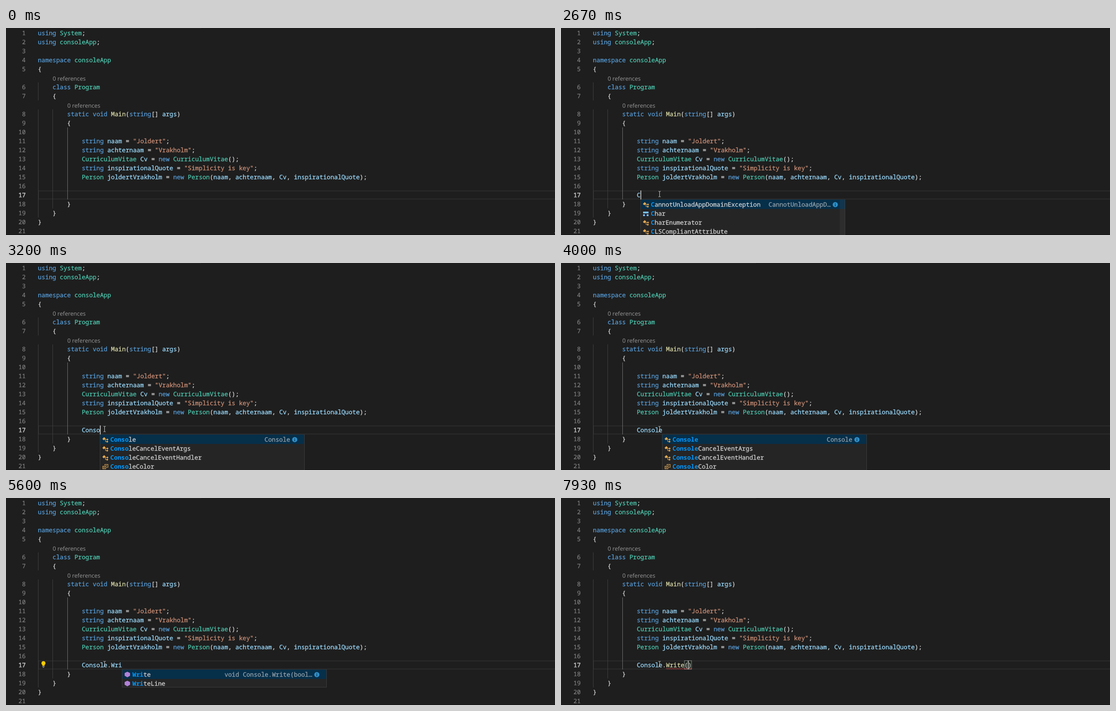
An HTML page that plays this animation: 1217x460 px, repeating every 8000 ms.

```html
<!DOCTYPE html>
<html lang="en">
<head>
<meta charset="utf-8">
<title>Editor</title>
<style>
  html, body { margin: 0; width: 100%; height: 100%; overflow: hidden; background: #1e1e1e; }
  svg { display: block; width: 1217px; height: 460px; }
  text {
    font: 13.51px "Noto Sans Mono", "DejaVu Sans Mono", monospace;
    font-variant-ligatures: none;
    text-rendering: geometricPrecision;
    white-space: pre;
    fill: currentColor;
    stroke: currentColor;
    stroke-width: .3px;
  }
  .lens { font: 12.7px "Open Sans", "Noto Sans", sans-serif; color: #999; stroke: none; }
  .num { color: #858585; text-anchor: end; stroke-width: .15px; }
  .now { color: #c6c6c6; stroke-width: .6px; }
  .key { color: #569cd6; }
  .type { color: #4ec9b0; }
  .str { color: #ce9178; }
  .fn { color: #dcdcaa; }
  .var { color: #9cdcfe; }
  .sym, .item { color: #d4d4d4; }
  .hit { color: #0097fb; font-weight: bold; stroke: none; }
  .detail { color: #d4d4d4; opacity: .7; text-anchor: end; }
</style>
</head>
<body>
<svg viewBox="0 0 1217 460">
  <defs>
    <g id="class" fill="#e8ab53">
      <path d="M.5 5 4.500 1 8 4 4 8Z M9.500 6.200 12 4l2 2.200-2.300 2.200Z M9 11l2.500-2.300L13.800 11l-2.300 2.300Z"/>
      <path d="M6 6h4M7.500 6v5h2" fill="none" stroke="#e8ab53"/>
    </g>
    <path id="struct" fill="#75beff" d="M1 2h12v4H1Z M1 8h4v4H1Z M9 8h4v4H9Z"/>
    <path id="enum" fill="none" stroke="#e8ab53" stroke-width="1.1"
      d="M6 4V1.500h7V8H9M8 4h3M1.500 5.500h6.500v6H1.500ZM3 7.500h3M3 9.500h3"/>
    <g id="prop">
      <path d="M2 11 8 5" stroke="#c5c5c5" stroke-width="3" stroke-linecap="round"/>
      <path d="M13.400 3 11 5.200 8.800 3.200 11 .6A4 4 0 1 0 13.400 3Z" fill="#c5c5c5"/>
    </g>
    <path id="method" fill="#b180d7" d="M7 0 13 3v6l-6 3.500L1 9V3Z"/>
  </defs>
  <g id="page"></g>
  <g id="live"></g>
  <path id="mouse" d="M-2.500-6H-.5L0-5.500.500-6H2.500M0-5.500V5.500M-2.500 6H-.5L0 5.500.500 6H2.500" fill="none" stroke="#d0d0d0"/>
</svg>
<script>
const LOOP = 8000, CHAR = 8.107, LEFT = 70.7, TYPED_COL = 12;
const $ = id => document.getElementById(id);
const colX = col => LEFT + col * CHAR;
const rowY = row => 1 + row * 20;
// Carets snap to whole pixels.
const caretX = col => Math.floor(70.41 + col * 8.13);

const text = (x, y, cls, s) => `<text x="${x}" y="${y}" class="${cls}">${s}</text>`;
const rect = (x, y, w, h, fill, more = '') =>
  `<rect x="${x}" y="${y}" width="${w}" height="${h}" fill="${fill}" ${more}/>`;

const keywords = /^(using|namespace|class|static|void|string|new)$/;
const types = /^(System|consoleApp|Program|CurriculumVitae|Person)$/;

function kind(token, next) {
  if (token[0] === '"') return 'str';
  if (keywords.test(token)) return 'key';
  if (types.test(token)) return 'type';
  if (!/\w/.test(token)) return 'sym';
  return next === '(' ? 'fn' : 'var';
}

function code(src, col, row) {
  return [...src.matchAll(/"[^"]*"|\w+|[^\s\w"]+/g)].map(m =>
    text(colX(col + m.index), rowY(row) + 15,
      kind(m[0], src[m.index + m[0].length]), m[0])).join('');
}

const source = `using System;
using consoleApp;

namespace consoleApp
{
    # 0 references
    class Program
    {
        # 0 references
        static void Main(string[] args)
        {

            string naam = "Joldert";
            string achternaam = "Vrakholm";
            CurriculumVitae Cv = new CurriculumVitae();
            string inspirationalQuote = "Simplicity is key";
            Person joldertVrakholm = new Person(naam, achternaam, Cv, inspirationalQuote);


        }
    }
}
`;

function drawPage() {
  let out = rect(131, 0, 301, 1, '#2b2b2b') + rect(0, 459, 1217, 1, '#151515');
  out += rect(72, 362, 1160, 18, 'none', 'stroke="#2b2b2b" stroke-width="2"');
  const guide = (x, from, to, fill = '#404040') => rect(x, from, 1, to - from, fill);
  out += guide(71, 121, 161) + guide(71, 181, 421) + guide(103, 181, 401);
  out += guide(136, 221, 381, '#707070');
  let n = 0;
  source.split('\n').forEach((line, row) => {
    const src = line.trim(), col = line.search(/\S|$/), y = rowY(row) + 15;
    if (src[0] === '#') {
      out += text(colX(col) + .4, y + 1, 'lens', src.slice(2));
    } else {
      n++;
      out += text(43.6, y, n === 17 ? 'num now' : 'num', n) + code(src, col, row);
    }
  });
  $('page').innerHTML = out;
}

// Suggestions: the detail of the first entry, then "icon label" rows.
const consoleList = ['Console', 'class Console', 'class ConsoleCancelEventArgs',
  'class ConsoleCancelEventHandler', 'enum ConsoleColor'];
const writeList = ['void Console.Write(bool…', 'method Write', 'method WriteLine'];
const lists = {
  'C': ['CannotUnloadAppD…', 'class CannotUnloadAppDomainException', 'struct Char',
    'class CharEnumerator', 'class CLSCompliantAttribute'],
  'Co': ['Comparison', 'class Comparison', 'class Console',
    'class ConsoleCancelEventArgs', 'class ConsoleCancelEventHandler'],
  'Console.': ['ConsoleColor BackgroundColor', 'prop BackgroundColor', 'method Beep',
    'prop BufferHeight', 'prop BufferWidth'],
  'Console.W': ['int WindowHeight', 'prop WindowHeight', 'prop WindowLeft',
    'prop WindowTop', 'prop WindowWidth'],
  'Console.Wr': writeList,
  'Console.Wri': writeList
};

function popup(prefix, barAlpha) {
  const [detail, ...rows] = lists[prefix] || consoleList;
  const x = caretX(TYPED_COL + prefix.length) + 1;
  const hit = prefix.split('.').pop().length;
  const height = rows.length < 4 ? 40 : 100;
  let out = rect(x - .5, 381.5, 453, height - 1, '#252526', 'stroke="#3c3c3c"');
  out += rect(x, 381.3, 452, 20.7, '#062f4a');
  rows.forEach((row, i) => {
    const [icon, label] = row.split(' '), y = 382 + i * 20;
    out += `<use href="#${icon}" x="${x + 4}" y="${y + 4}"/>`;
    if (hit) out += text(x + 22.3, y + 15, 'hit', label.slice(0, hit));
    out += text(x + 22.3 + hit * CHAR, y + 15, 'item', label.slice(hit));
  });
  out += text(x + 420.8, 397, 'detail', detail);
  out += `<circle cx="${x + 431}" cy="392.5" r="5.7" fill="#2f8fc8"/>`;
  out += rect(x + 430.3, 389, 1.4, 1.5, '#062f4a') + rect(x + 430.3, 391.5, 1.4, 4.5, '#062f4a');
  if (barAlpha) out += rect(x + 441, 382, 11, 78, '#797979', `opacity="${barAlpha * .4}"`);
  return out;
}

const bulb = `<path d="M83 362.500a4.500 4.500 0 0 1 2.500 8.200V373h-5v-2.300a4.500 4.500 0 0 1 2.500-8.200Z" fill="#fc0"/>`
  + rect(80.5, 374, 5, 1, '#c5c5c5') + rect(81.5, 376, 3, 1, '#c5c5c5');

function squiggle() {
  let d = 'M233 380.5';
  for (let x = 235; x < 290; x += 2) d += `L${x} ${(x - 233) % 4 ? 378.5 : 380.5}`;
  return `<path d="${d}" fill="none" stroke="#f14c4c"/>`;
}

// Time, typed text, caret shown, suggestion prefix, caret steps back from the end
const steps = [
  [0, '', 0], [1200, '', 1], [1670, '', 0], [2130, '', 1],
  [2600, 'C', 1], [2670, 'C', 1, 'C'],
  [2800, 'Co', 1, 'Co'], [2930, 'Con', 1, 'Con'],
  [3070, 'Cons', 1, 'Cons'], [3200, 'Conso', 1, 'Conso'],
  [3400, 'Consol', 1, 'Consol'], [3470, 'Console', 1, 'Console'],
  [4000, 'Console', 0, 'Console'], [4070, 'Console.', 1],
  [4130, 'Console.', 1, 'Console.'], [4270, 'Console.W', 1, 'Console.'],
  [4330, 'Console.W', 1, 'Console.W'], [4800, 'Console.W', 0, 'Console.W'],
  [5070, 'Console.Wr', 1, 'Console.Wr'], [5130, 'Console.Wri', 1, 'Console.Wri'],
  [5600, 'Console.Wri', 0, 'Console.Wri'],
  [5800, 'Console.Write', 1], [6330, 'Console.Write', 0],
  [6530, 'Console.Write()', 1, '', 1], [6600, 'Console.Write()', 1],
  [7070, 'Console.Write()', 0], [7600, 'Console.Write()', 1],
  [7930, 'Console.Write()', 1, '', 1]
];

const clamp = v => Math.max(0, Math.min(1, v));

function drawLive(t) {
  const [, typed, caret, prefix, back = 0] = steps.findLast(s => s[0] <= t);
  const end = TYPED_COL + typed.length;
  let out = '';
  if (typed.endsWith('()')) {
    for (const col of [end - 2, end - 1])
      out += rect(caretX(col) + .5, 361.5, 8, 19, 'rgba(0,100,0,.1)', 'stroke="#888"');
  }
  out += code(typed, TYPED_COL, 18);
  if (t >= 7330) out += squiggle();
  if (t >= 5400 && t < 6070) out += bulb;
  if (caret) out += rect(caretX(end - back), 361, 2, 20, '#aeafad');
  if (prefix) {
    const tick = Math.floor((t - 2600) / 66.6);
    const bar = t < 3000 ? clamp(tick / 4) : clamp((9 - tick) / 3);
    out += popup(prefix, bar);
  }
  return out;
}

function mouseAt(t) {
  const k = t < 200 ? 0 : clamp((Math.floor((t - 200) / 72.7) + 1) / 12);
  const e = k * k * (3 - 2 * k);
  return `translate(${1218.5 - 1000 * e} ${461 - 92 * e})`;
}

drawPage();
let shown;
const start = performance.now();
function frame() {
  const t = (performance.now() - start) % LOOP;
  const live = drawLive(t);
  if (live !== shown) $('live').innerHTML = shown = live;
  $('mouse').setAttribute('transform', mouseAt(t));
  requestAnimationFrame(frame);
}
frame();
</script>
</body>
</html>
```
